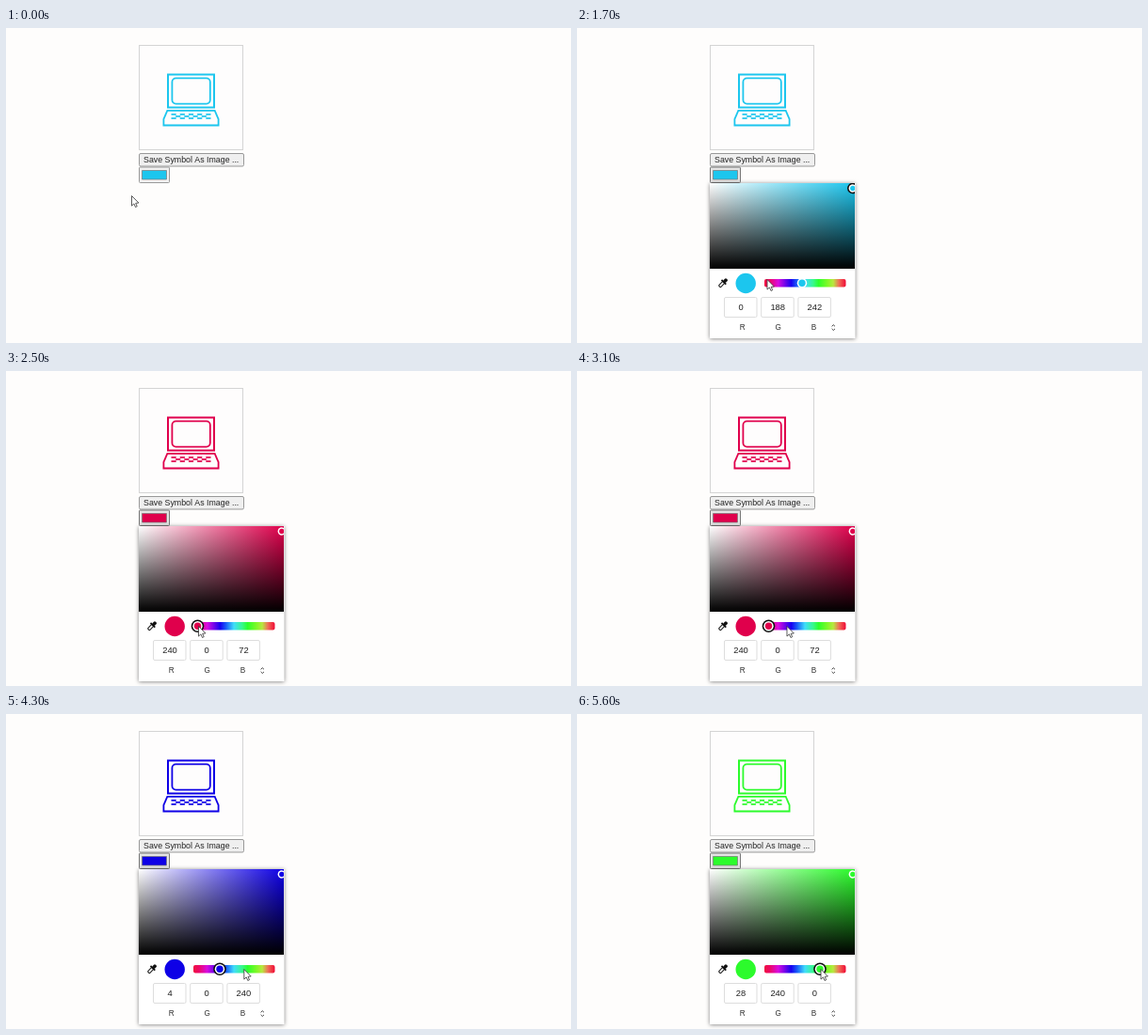
An HTML page with a canvas for the animation above (5700 ms loop, 600x335 px).

```html
<!DOCTYPE html>
<html lang="en">
<head>
<meta charset="utf-8">
<title>Symbol colour picker</title>
<style>
html, body { margin: 0; width: 100%; height: 100%; overflow: hidden; background: #fefdfc; }
canvas { display: block; width: 600px; height: 335px; }
</style>
</head>
<body>
<canvas id="stage" width="600" height="335"></canvas>
<script>
const ctx = document.getElementById('stage').getContext('2d');
const LOOP = 5700;
const OPEN_AT = 700;
const FONT = '"Liberation Sans", Arial, sans-serif';

// Colour picked from each moment on, with the slider position
const picks = [
  { at: 0, color: '#1cc6ee', rgb: [0, 188, 242], x: 239 },
  { at: 2000, color: '#e0004c', rgb: [240, 0, 72], x: 203.5 },
  { at: 3400, color: '#0e00e6', rgb: [4, 0, 240], x: 227 },
  { at: 4600, color: '#2cfb2c', rgb: [28, 240, 0], x: 258 }
];

// Pointer path: time, x, y
const path = [
  [0, 133.5, 178.5], [100, 133.5, 178.5], [550, 159, 157], [750, 159, 157],
  [1050, 161.5, 181], [1200, 161.5, 181], [1650, 202, 267.5], [1750, 202, 267.5],
  [1950, 204.5, 271.5], [2600, 204.5, 271.5], [3300, 227.5, 271.5],
  [3800, 227.5, 271.5], [4500, 259, 271.5]
];

function pointerAt(t) {
  const i = path.findIndex(p => p[0] > t);
  if (i < 0) return path[path.length - 1].slice(1);
  const [t0, x0, y0] = path[i - 1], [t1, x1, y1] = path[i];
  const u = (t - t0) / (t1 - t0), k = u * u * (3 - 2 * u);
  return [x0 + (x1 - x0) * k, y0 + (y1 - y0) * k];
}

function box(x, y, w, h, r, fill, stroke, line = 1) {
  ctx.beginPath();
  ctx.roundRect(x, y, w, h, r);
  if (fill) { ctx.fillStyle = fill; ctx.fill(); }
  if (stroke) { ctx.strokeStyle = stroke; ctx.lineWidth = line; ctx.stroke(); }
}

function disc(x, y, r, fill) {
  ctx.beginPath();
  ctx.arc(x, y, r, 0, 7);
  ctx.fillStyle = fill;
  ctx.fill();
}

function poly(points, closed) {
  ctx.beginPath();
  points.forEach(([x, y]) => ctx.lineTo(x, y));
  if (closed) ctx.closePath();
}

function label(text, x, y, size, color = '#222') {
  ctx.font = `${size}px ${FONT}`;
  ctx.textAlign = 'center';
  ctx.fillStyle = color;
  ctx.fillText(text, x, y);
}

function gradient(x0, y0, x1, y1, ...stops) {
  const g = ctx.createLinearGradient(x0, y0, x1, y1);
  stops.forEach(([at, color]) => g.addColorStop(at, color));
  return g;
}

function drawSymbol(color) {
  ctx.setLineDash([1, 1]);
  box(141.5, 18.5, 110, 111, 0, '#fefdfd', '#aaa');
  ctx.setLineDash([]);
  box(172, 49.5, 49, 35, 0, null, color, 2);
  box(176.4, 53.4, 40.4, 27.2, 4, null, color, 1.8);
  poly([[171.3, 87.8], [221.7, 87.8], [225.6, 97], [225.6, 103.5], [167.4, 103.5], [167.4, 97]], true);
  ctx.stroke();
  ctx.fillStyle = color;
  for (let row = 0; row < 3; row++) {
    const shift = row === 1 ? 4.6 : 0;
    for (let x = 175.5 + shift; x < 216; x += 9.2) {
      ctx.fillRect(x, 91 + row * 2.1, Math.min(5.2, 218 - x), 1.7);
    }
  }
}

function drawControls(color, open) {
  box(141.5, 133.5, 111, 13.5, 1.5, '#efefef', '#999');
  label('Save Symbol As Image ...', 196.7, 143.2, 8.8);
  box(141.5, 148, 32, 16.5, 1, open ? '#e4e4e4' : '#f1f1f1', open ? '#777' : '#9a9a9a');
  box(144.5, 151.5, 26, 9.5, 0, color, '#777', 0.7);
}

function drawDropper() {
  ctx.save();
  ctx.translate(154.8, 271.4);
  ctx.rotate(Math.PI / 4);
  box(-1.4, -1.4, 2.8, 6.3, 0.8, '#fff', '#222', 1.1);
  ctx.fillStyle = '#111';
  ctx.fillRect(-3.4, -2.4, 6.8, 1.7);
  box(-1.8, -6.3, 3.6, 4.6, 1.4, '#111');
  ctx.restore();
}

function thumb(x, y, r, color, focused) {
  if (focused) disc(x, y, r + 1.6, '#111');
  disc(x, y, r, '#fff');
  disc(x, y, r - 1.5, color);
}

function drawPicker(pick, hueFocused) {
  ctx.save();
  ctx.shadowColor = 'rgba(0,0,0,.5)';
  ctx.shadowBlur = 4;
  ctx.shadowOffsetY = 0.5;
  box(141, 165, 154.5, 165, 0.5, '#fff');
  ctx.restore();

  ctx.save();
  ctx.beginPath();
  ctx.rect(141, 165, 154, 91);
  ctx.clip();
  ctx.fillStyle = gradient(141, 0, 295, 0, [0, '#fff'], [1, pick.color]);
  ctx.fillRect(141, 165, 154, 91);
  ctx.fillStyle = gradient(0, 165, 0, 256, [0, 'rgba(0,0,0,0)'], [1, '#000']);
  ctx.fillRect(141, 165, 154, 91);
  thumb(292.8, 170.5, 4.2, pick.color, !hueFocused);
  ctx.restore();

  drawDropper();
  disc(179.2, 271.5, 10.7, pick.color);

  const hues = gradient(199, 0, 285, 0,
    [0, '#f01040'], [0.07, '#ec0868'], [0.17, '#d80ce0'], [0.33, '#1800f0'], [0.4, '#1858f8'],
    [0.5, '#40dcfa'], [0.6, '#38f890'], [0.67, '#2cff2c'], [0.78, '#80f828'],
    [0.85, '#b8e840'], [0.92, '#f07058'], [1, '#f01038']);
  box(199, 267, 86.5, 8.5, 2, hues);
  thumb(pick.x, 271.3, 5.2, pick.color, hueFocused);

  pick.rgb.forEach((value, i) => {
    const x = 174 + 39.2 * i;
    box(x - 17.5, 286.5, 34.5, 21, 1.5, '#fff', '#ddd');
    label(value, x, 300.4, 9.4);
    label('RGB'[i], 175.6 + 38 * i, 321.3, 8.2, '#333');
  });
  ctx.strokeStyle = '#333';
  ctx.lineWidth = 0.9;
  for (const s of [-1, 1]) {
    poly([[270.6, 318.6 + s * 1.3], [272.3, 318.6 + s * 2.9], [274, 318.6 + s * 1.3]]);
    ctx.stroke();
  }
}

function drawPointer([x, y]) {
  ctx.save();
  ctx.translate(x, y);
  poly([[0, 0], [0, 10.6], [2.4, 8.4], [4, 12], [5.7, 11.2], [4.2, 7.8], [7.4, 7.5]], true);
  ctx.fillStyle = '#fff';
  ctx.fill();
  ctx.strokeStyle = '#333';
  ctx.lineWidth = 0.8;
  ctx.stroke();
  ctx.restore();
}

function draw(t) {
  const pick = picks.filter(p => p.at <= t).pop();
  const open = t >= OPEN_AT;
  ctx.fillStyle = '#fefdfc';
  ctx.fillRect(0, 0, 600, 335);
  drawSymbol(pick.color);
  drawControls(pick.color, open);
  if (open) drawPicker(pick, pick !== picks[0]);
  drawPointer(pointerAt(t));
}

const start = performance.now();
function tick() {
  draw((performance.now() - start) % LOOP);
  requestAnimationFrame(tick);
}
tick();
</script>
</body>
</html>
```
